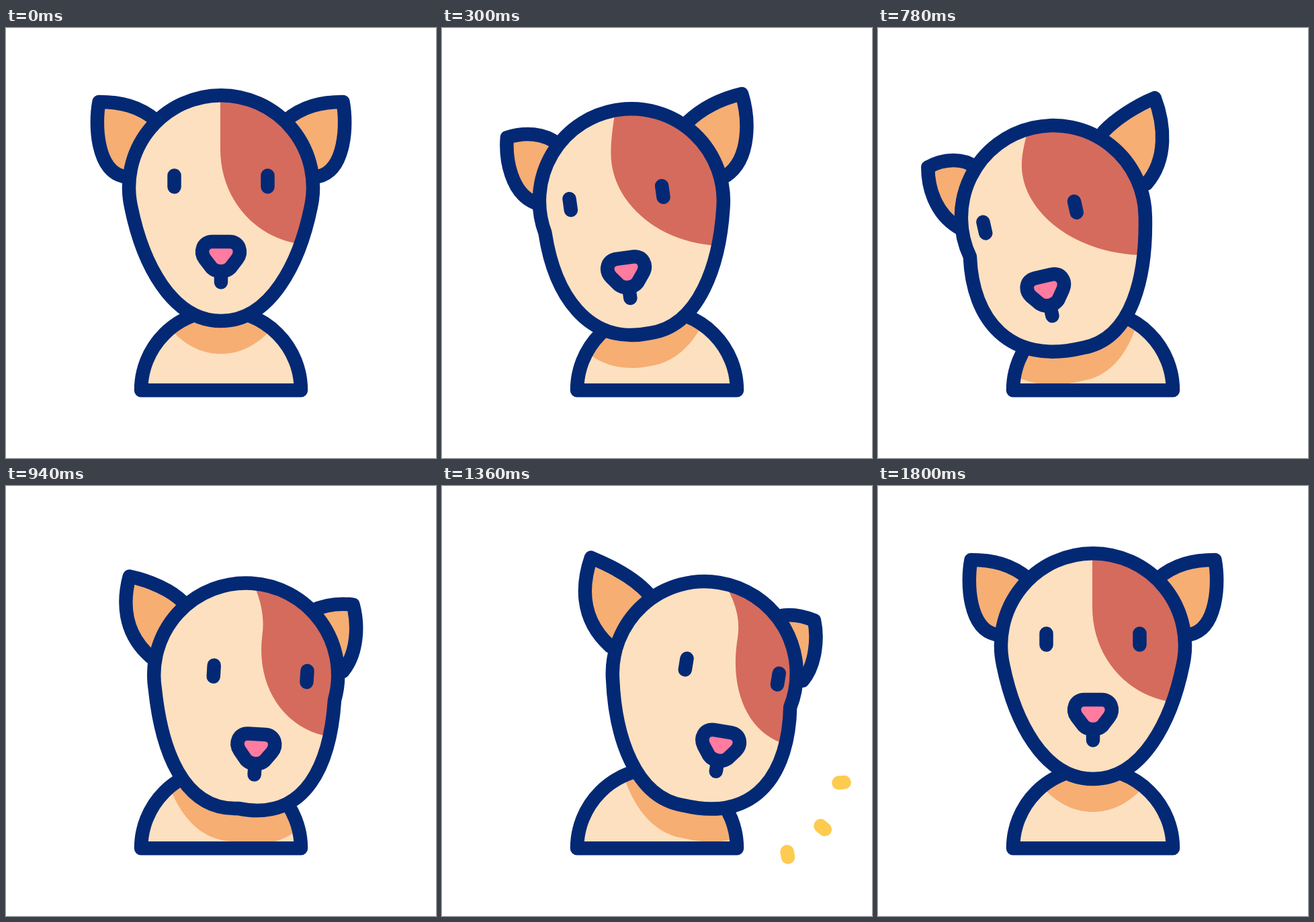
Write an HTML page that moves like this. It is 640 by 640 pixels and loops after 2400 ms.

```html
<!DOCTYPE html>
<html lang="en">
<head>
<meta charset="utf-8">
<title>Dog tilting its head</title>
<style>
  html, body { margin: 0; width: 100%; height: 100%; overflow: hidden; background: #fff; }
  svg { display: block; width: 100%; height: 100%; }
  .line { fill: none; stroke: #032975; }
  .skin { fill: #fde0bf; }
  .tan { fill: #f6ae73; }
  g, path { stroke-width: 20.5; stroke-linecap: round; stroke-linejoin: round; }
</style>
</head>
<body>
<svg viewBox="0 0 640 640">
  <defs>
    <path id="torso" d="M201 539.3A119 119 0 0 1 439 539.3Z"/>
    <clipPath id="torsoClip"><use href="#torso"/></clipPath>
    <clipPath id="skullClip"><path id="skullMask"/></clipPath>
  </defs>
  <use href="#torso" class="skin"/>
  <g clip-path="url(#torsoClip)"><path id="shade" class="tan"/></g>
  <use href="#torso" class="line"/>
  <g id="head">
    <path id="earL" class="tan" stroke="#032975"/>
    <path id="earR" class="tan" stroke="#032975"/>
    <path id="skull" class="skin"/>
    <path id="patch" fill="#d56b5d" clip-path="url(#skullClip)"/>
    <path id="outline" class="line"/>
    <g id="face" class="line">
      <path d="M-69.5 -8.5V8.5M69.5 -8.5V8.5M0 139V150.5"/>
      <path fill="#ff7ba0" d="M-13 90H13C27 90 32 105 24 116L14 129C7 136 -7 136 -14 129L-24 116C-32 105 -27 90 -13 90Z"/>
    </g>
  </g>
  <path id="marks" fill="none" stroke="#fdcb50"/>
</svg>
<script>
const LOOP = 2400, STEP = 20, SWING = 600;
const $ = id => document.getElementById(id);
const mix = (a, b, k) => Array.isArray(a) ? a.map((v, i) => mix(v, b[i], k)) : a + (b - a) * k;
const clamp = v => Math.min(1, Math.max(0, v));
const ease = u => u < .5 ? 8 * u ** 4 : 1 - 8 * (1 - u) ** 4;
const progress = (t, start) => ease(clamp((t - start) / SWING));
const mirror = pts => pts.map((v, i) => i % 2 ? v : -v);

// Shapes are relative to the skull centre: ears run root, tip, lower end.
const restEar = [96, -99, 122, -121, 150, -127, 181.5, -127, 188, -93, 185, -25, 145, -16];
const rest = {
  pos: [320, 237], turn: 0, bulge: [0, 0], face: [0, -9],
  earL: mirror(restEar), earR: restEar,
  patch: [-1, -140, -1, -110, -1, -85, -1, -57, -1, 14, 46, 70, 109, 83]
};
const left = {
  pos: [250, 282], turn: -14.6, bulge: [1, 0], face: [-41, 0],
  earL: [-120, -72, -137, -84, -165, -82, -188, -66.5, -187, -38, -175, 0, -142, 19],
  earR: [72, -131, 90, -151, 121, -173, 150, -186, 165.5, -146, 171, -93, 138, -55],
  patch: [-42, -134, -50, -112, -55, -97, -55, -80, -54, -15, 22, 48, 127, 52]
};
const right = {
  pos: [393.5, 281], turn: 9.5, bulge: [0, 1], face: [42.5, -2.5],
  earL: [-83, -119, -102, -141, -136, -160, -168.5, -174, -181, -138, -188, -85, -140, -41],
  earR: [108, -84, 125, -88, 144, -85, 162.5, -77, 168, -52, 165, -12, 146, 12],
  patch: [30, -135, 47, -108, 56, -82, 51, -52, 38, 25, 65, 85, 112, 103]
};

const blend = (a, b, k) => Object.fromEntries(Object.keys(a).map(n => [n, mix(a[n], b[n], k)]));

// Near rest the head sinks later than it slides.
function leaning(side, k) {
  const pose = blend(rest, side, k);
  pose.pos[1] = mix(rest.pos[1], side.pos[1], k ** 1.33);
  return pose;
}

function poseAt(t) {
  if (t < 593) return leaning(left, progress(t, -7));
  if (t < 1204) return blend(left, right, progress(t, 593));
  return leaning(right, 1 - progress(t, 1204));
}

const curve = p => `M${p.slice(0, 2)}C${p.slice(2, 8)}C${p.slice(8)}`;

function skullPath({ turn, bulge }) {
  const a = turn * Math.PI / 180, c = Math.cos(a), s = Math.sin(a);
  const rot = (x, y) => [x * c - y * s, x * s + y * c];
  const chin = rot(0, 199);
  const jaw = (sign, k) => {
    const joint = rot(sign * 133.8, 29.6);
    return {
      joint,
      upper: mix(rot(sign * 117, 112), [joint[0] - sign, joint[1] + 95], k),
      lower: mix(rot(sign * 74, 199), [chin[0] + sign * 113, chin[1] + 27], k)
    };
  };
  const l = jaw(-1, bulge[0]), r = jaw(1, bulge[1]);
  return `M${l.joint}A137 137 0 1 1 ${r.joint}C${r.upper},${r.lower},${chin}` +
    `C${l.lower},${l.upper},${l.joint}Z`;
}

const rays = [[-5, 45], [40, 38], [80, 47]];
function burst(t, start, x, y, sign) {
  const tip = 57 * clamp((t - start) / 140);
  const tail = 57 * clamp((t - start - 100) / 140);
  if (tip <= tail) return '';
  return rays.map(([deg, from]) => {
    const a = deg * Math.PI / 180;
    const at = d => [x + sign * (from + d) * Math.cos(a), y + (from + d) * Math.sin(a)];
    return `M${at(tail)}L${at(tip)}`;
  }).join('');
}

function draw(t) {
  const pose = poseAt(t), [x, y] = pose.pos, skull = skullPath(pose);
  $('head').setAttribute('transform', `translate(${x} ${y})`);
  $('shade').setAttribute('transform', `translate(${x} ${y + 49})`);
  for (const id of ['skull', 'skullMask', 'outline', 'shade']) $(id).setAttribute('d', skull);
  for (const id of ['earL', 'earR']) $(id).setAttribute('d', curve(pose[id]));
  $('patch').setAttribute('d', curve(pose.patch) + 'l40 8L220 -200H' + pose.patch[0] + 'Z');
  $('face').setAttribute('transform', `translate(${pose.face}) rotate(${pose.turn})`);
  $('marks').setAttribute('d', burst(t, 412, 165, 439, -1) + burst(t, 1140, 497, 450, 1));
}

const began = performance.now();
function tick() {
  const t = (performance.now() - began) % LOOP;
  draw(Math.floor(t / STEP) * STEP);
  requestAnimationFrame(tick);
}
tick();
</script>
</body>
</html>
```
